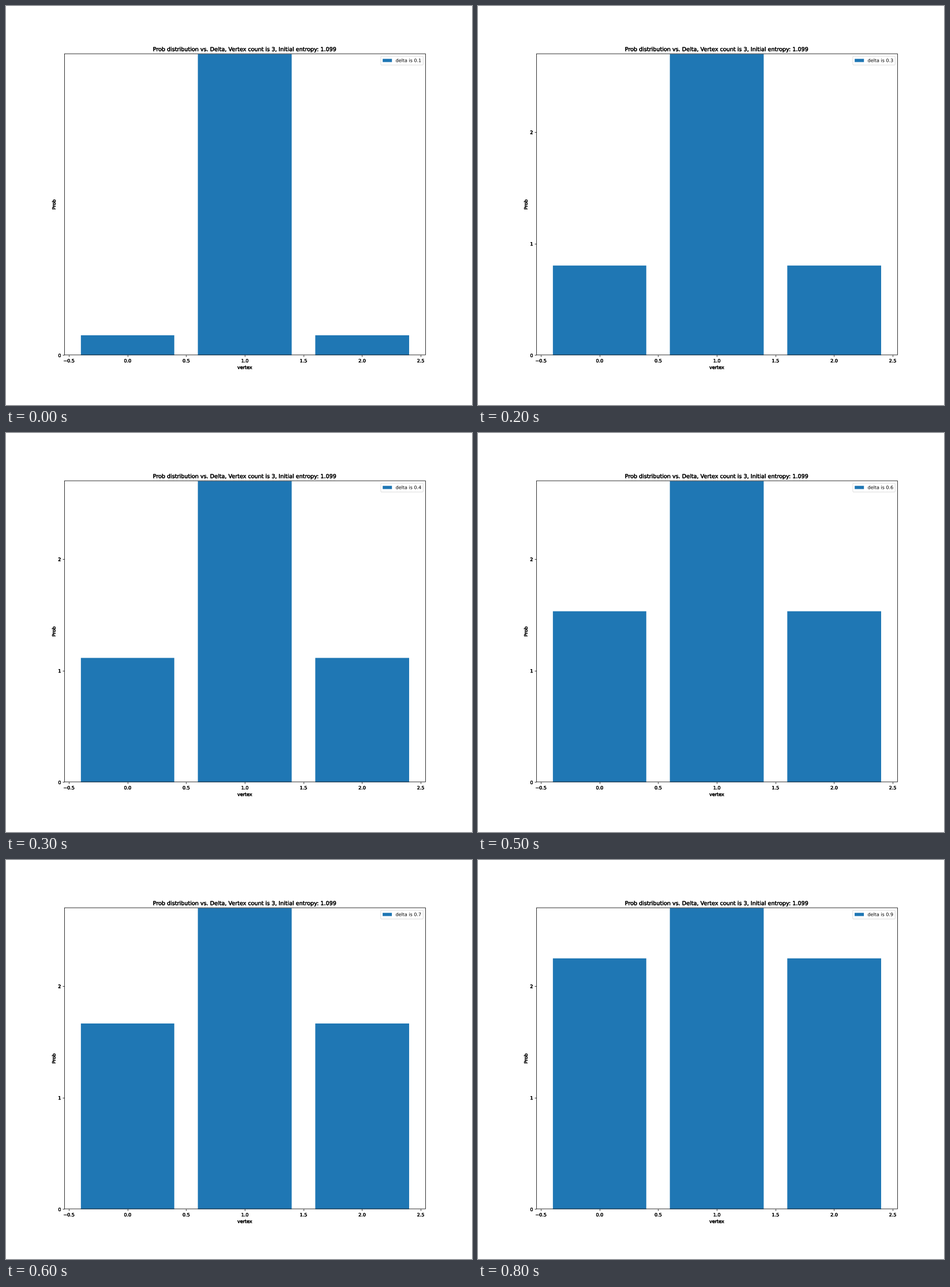
Write a matplotlib script that moves like this. It is 808 by 693 pixels and loops after 900 ms.

```python
import matplotlib.pyplot as plt
import numpy as np
from matplotlib.animation import FuncAnimation
from matplotlib.patches import Rectangle
from matplotlib.patheffects import Normal, withStroke
from matplotlib.transforms import Affine2D

W, H = 808, 693
DPI = W / 14
GRID_W, GRID_H = 1008, 864  # layout grid in points
LEFT, BOTTOM, WIDTH, HEIGHT = 126, 108, 781.2, 652.32
X_MIN, X_MAX, Y_MAX = -0.54, 2.54, 2.7
BAR_COLOR = "#1f77b4"
HEAVY = [withStroke(linewidth=0.5, foreground="black")]

# side bar height as a share of the axes height, for delta 0.1 to 0.9
SHARES = [0.0657, 0.178, 0.2976, 0.4125, 0.496, 0.5667, 0.6155, 0.6528, 0.833]

plt.rcParams.update({"font.family": "DejaVu Sans", "font.size": 10})
fig = plt.figure(figsize=((W + 1e-6) / DPI, (H + 1e-6) / DPI), dpi=DPI,
                 facecolor="white")
grid = Affine2D().scale(1 / GRID_W, 1 / GRID_H) + fig.transFigure

ax = fig.add_axes([LEFT / GRID_W, BOTTOM / GRID_H, WIDTH / GRID_W, HEIGHT / GRID_H])
ax.set_xlim(X_MIN, X_MAX)
ax.set_ylim(0, Y_MAX)
ax.set_xticks(np.arange(-0.5, 2.6, 0.5))
ax.tick_params(width=1)
ax.set_title("Prob distribution vs. Delta, Vertex count is 3, Initial entropy: 1.099")
ax.set_xlabel("vertex", labelpad=3)
ax.set_ylabel("Prob", labelpad=3)
ax.spines[:].set_visible(False)


def grid_x(value):
    return round(LEFT + (value - X_MIN) / (X_MAX - X_MIN) * WIDTH)


def add_box(x, y, w, h, **style):
    box = Rectangle((x, y), w, h, transform=grid, snap=False, **style)
    fig_box = ax.add_artist(box)
    fig_box.set_clip_on(False)
    return fig_box


def add_bar(center):
    left, right = grid_x(center - 0.4), grid_x(center + 0.4)
    return add_box(left, BOTTOM, right - left, int(HEIGHT), fc=BAR_COLOR, lw=0)


bars = [add_bar(i) for i in range(3)]
add_box(LEFT + 0.5, BOTTOM + 0.5, int(WIDTH), int(HEIGHT),
        fill=False, ec="black", lw=1, zorder=2.5)

legend = ax.legend([bars[1]], ["delta is 0.1"], loc="upper right")
legend.get_frame().set_snap(False)
legend.get_patches()[0].set_snap(False)
caption = legend.get_texts()[0]
caption.set_path_effects([Normal()])


def update(step):
    for bar in (bars[0], bars[2]):
        bar.set_height(round(SHARES[step] * HEIGHT))
    caption.set_text(f"delta is {(step + 1) / 10:.1f}")
    ticks = [0] if step == 0 else [0, 1, 2]
    ax.set_yticks(ticks, [str(t) for t in ticks])
    labels = [ax.title, ax.xaxis.label, ax.yaxis.label]
    for text in labels + ax.get_xticklabels() + ax.get_yticklabels():
        text.set_path_effects(HEAVY)
    return []


anim = FuncAnimation(fig, update, frames=len(SHARES), interval=100,
                     init_func=lambda: update(0), repeat=True, repeat_delay=0)
plt.show()
```
